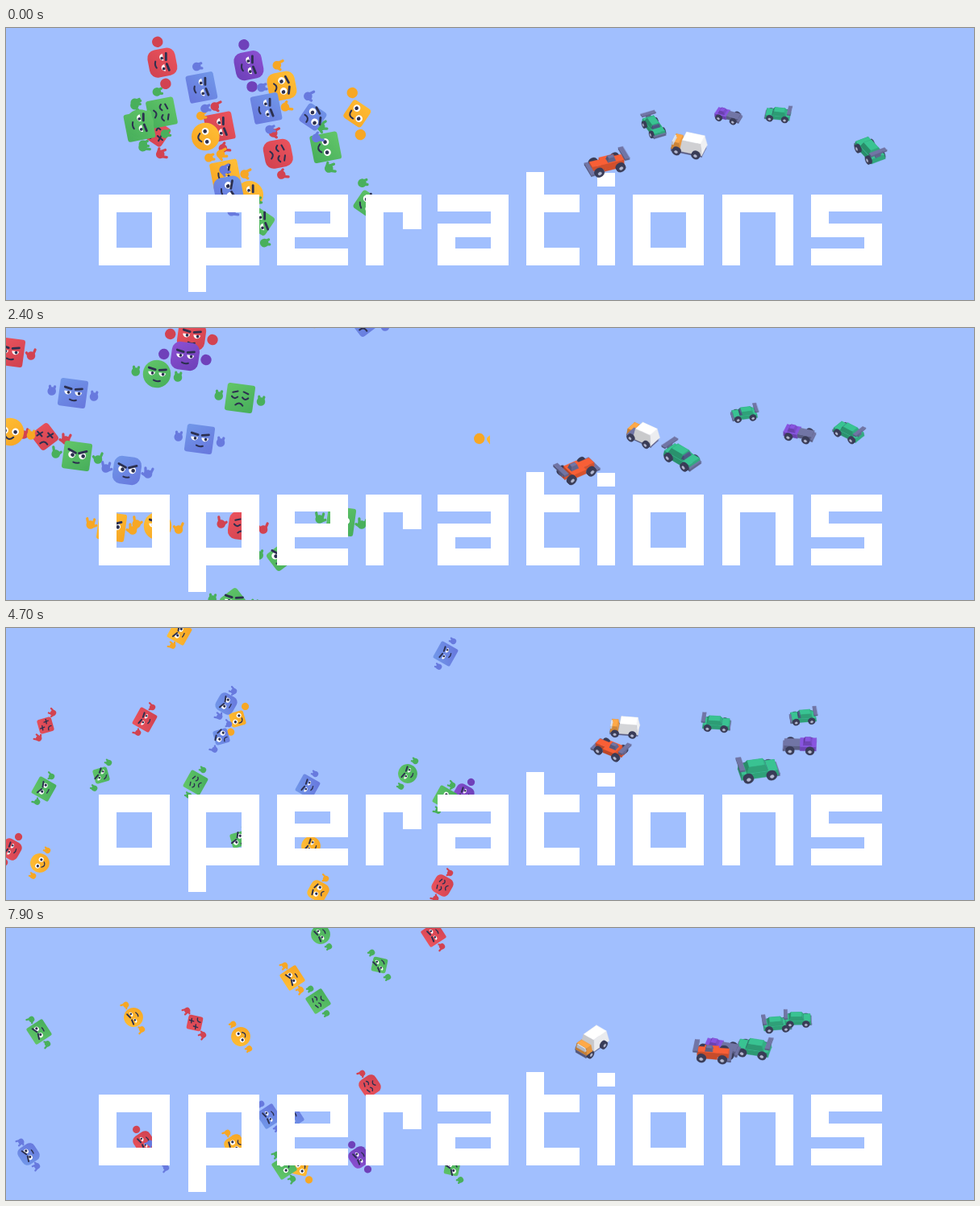
Recreate the animation shown at these times as an HTML page with a canvas. Size 1200x338 px, loop 8 s.

```html
<!DOCTYPE html>
<html lang="en">
<head>
<meta charset="utf-8">
<title>operations</title>
<style>
  html, body { margin: 0; width: 100%; height: 100%; overflow: hidden; background: #a1bffe; }
  canvas { display: block; width: 1200px; height: 338px; }
</style>
</head>
<body>
<canvas id="stage" width="1200" height="338" role="img" aria-label="operations"></canvas>
<script>
const ctx = document.getElementById('stage').getContext('2d');
const LOOP = 8000, STEP = 100, INK = '#2c3050', RAD = Math.PI / 180;

const clamp = k => Math.max(0, Math.min(1, k));
const mix = (a, b, k) => a + (b - a) * k;
const smooth = (from, to, v) => {
  const k = clamp((v - from) / (to - from));
  return k * k * (3 - 2 * k);
};
const random = seed => {
  const v = Math.sin(seed * 127.1 + 31.7) * 43758.5;
  return v - Math.floor(v);
};

// ---------- word ----------
const word = new Path2D();
const block = (x, y, r, b) => word.rect(x, y, r - x, b - y);
function ring(x) {
  block(x, 207, x + 88, 229);
  block(x, 273, x + 88, 295);
  block(x, 229, x + 22, 273);
  block(x + 66, 229, x + 88, 273);
}
function bars(x) {
  block(x, 207, x + 88, 228);
  block(x, 243, x + 88, 260);
  block(x, 274, x + 88, 295);
}
ring(115);
ring(226); block(226, 295, 248, 328);
bars(336); block(336, 228, 358, 274); block(402, 228, 424, 243);
block(446, 207, 515, 229); block(446, 229, 468, 295); block(492, 229, 515, 250);
bars(535); block(601, 228, 623, 274); block(535, 260, 557, 274);
block(645, 179, 667, 295); block(667, 207, 711, 229); block(667, 273, 711, 295);
block(733, 180, 755, 197); block(733, 207, 755, 295);
ring(777);
block(888, 207, 976, 229); block(888, 229, 910, 295); block(954, 229, 976, 295);
bars(998); block(998, 228, 1020, 243); block(1064, 260, 1086, 274);

// ---------- faces ----------
// Every CYCLE each face glides in a straight line to a new stop, then waits there.
const CYCLE = 3050, GLIDE = 1190, LEAD = 600;
const TONES = {
  red: ['#e9525c', '#d24351'],
  yellow: ['#ffbd35', '#f7a724'],
  green: ['#60c468', '#49b05c'],
  blue: ['#7095e8', '#687ade'],
  purple: ['#8a4fd0', '#6f41ba']
};
const faces = [];
function face(tone, shape, mood, hand, ...stops) {
  const seed = faces.length * 2 + 1;
  const first = [40 + 520 * random(seed), 30 + 290 * random(seed + 1)];
  faces.push({ tone, shape, mood, hand, stops: [first, ...stops] });
}

face('red', 'square', 'smirk', 'point', [5, 30], [172, 114], [530, 8]);
face('red', 'round', 'smirk', 'fist', [230, 10], [6, 275], [171, 266]);
face('red', 'diamond', 'dizzy', 'horns', [48, 135], [49, 121], [234, 118]);
face('red', 'round', 'sad', 'point', [293, 246], [541, 320], [451, 196]);
face('yellow', 'square', 'angry', 'horns', [131, 247], [215, 6], [355, 62]);
face('yellow', 'round', 'worried', 'point', [376, -18], [387, 327], [284, 270]);
face('yellow', 'diamond', 'smile', 'fist', [613, 140], [287, 113], [365, 298]);
face('yellow', 'circle', 'smirk', 'point', [188, 246], [378, 271], [158, 111]);
face('yellow', 'circle', 'smile', 'open', [5, 129], [42, 292], [291, 135]);
face('purple', 'round', 'smirk', 'fist', [222, 35], [567, 207], [438, 285]);
face('green', 'square', 'sad', 'open', [290, 87], [235, 192], [387, 91]);
face('green', 'square', 'angry', 'point', [88, 159], [47, 200], [41, 129]);
face('green', 'diamond', 'smirk', 'open', [282, 340], [118, 183], [463, 46]);
face('green', 'circle', 'smirk', 'open', [187, 57], [498, 181], [390, 8]);
face('green', 'diamond', 'angry', 'open', [340, 285], [288, 263], [553, 298]);
face('green', 'square', 'smile', 'horns', [415, 240], [544, 211], [345, 297]);
face('blue', 'square', 'smirk', 'open', [240, 138], [545, 32], [354, 235]);
face('blue', 'square', 'smirk', 'open', [83, 81], [374, 197], [326, 234]);
face('blue', 'diamond', 'worried', 'point', [444, -6], [267, 135], [188, 283]);
face('blue', 'round', 'angry', 'horns', [150, 177], [273, 94], [28, 281]);

function line(...p) {
  ctx.beginPath();
  for (let i = 0; i < p.length; i += 2) ctx.lineTo(p[i], p[i + 1]);
  ctx.stroke();
}
function disc(x, y, r, fill, from = 0, to = 7) {
  ctx.beginPath();
  ctx.arc(x, y, r, from, to);
  ctx.fillStyle = fill;
  ctx.fill();
}
function curve(x, y, w, bend) {
  ctx.beginPath();
  ctx.moveTo(x - w, y);
  ctx.quadraticCurveTo(x, y + bend, x + w, y);
  ctx.stroke();
}

function drawHand(side, kind, tone) {
  ctx.save();
  ctx.translate(side * 26, 1);
  ctx.scale(side, 1);
  disc(0, 0, kind === 'fist' ? 6.6 : 5.2, tone);
  ctx.strokeStyle = tone;
  ctx.lineWidth = 3.2;
  if (kind === 'horns') { line(-3, -1, -4, -7); line(3, -1, 5, -7); line(-3, 2, -7, 0); }
  if (kind === 'point') { line(2, -1, 4, -8); line(-3, 0, -6, -3); }
  if (kind === 'open') { line(-2, -1, -3, -6); line(2, -1, 3, -6); }
  ctx.restore();
}

function drawBody(shape) {
  ctx.beginPath();
  if (shape === 'circle') ctx.arc(0, 0, 17, 0, 7);
  else if (shape === 'diamond') {
    ctx.save();
    ctx.rotate(45 * RAD);
    ctx.roundRect(-13, -13, 26, 26, 4);
    ctx.restore();
  } else {
    ctx.roundRect(-17, -17, 34, 34, shape === 'round' ? 10 : 3);
  }
  ctx.fill();
}

function drawMood(mood) {
  ctx.strokeStyle = INK;
  for (const s of [-1, 1]) {
    const x = s * 6.5;
    ctx.lineWidth = 2;
    if (mood === 'dizzy') {
      line(x - 3, -5, x + 3, 0);
      line(x - 3, 0, x + 3, -5);
      continue;
    }
    if (mood === 'sad') {
      curve(x, -1, 3.6, 4);
      line(x - s * 3, -8, x + s * 3, -6);
      continue;
    }
    const lid = mood === 'smirk';
    if (lid) disc(x, -2, 4.3, '#fff', 0, Math.PI);
    else disc(x, -1, 4.3, '#fff');
    disc(x + (mood === 'smile' ? 0 : 1), lid ? -.4 : -.6, lid ? 1.8 : 2.3, INK);
    ctx.lineWidth = 2.8;
    if (mood === 'angry') line(x - s * 4.5, -3.5, x + s * 4.5, -7);
    if (mood === 'worried') line(x - s * 4, -9, x + s * 4, -6.5);
    if (lid) line(x - s * 4, -5, x + s * 4, -6.5);
  }
  ctx.lineWidth = 2;
  if (mood === 'smile') curve(0, 6, 5, 6);
  else if (mood === 'smirk') curve(1, 8, 4, 2);
  else if (mood === 'angry') curve(0, 8, 3.5, 1);
  else curve(0, 9, 4.5, -5);
}

function drawFaces(t) {
  const sec = t / 1000, n = Math.floor((t + LEAD) / CYCLE), age = (t + LEAD) % CYCLE;
  const k = clamp(age / GLIDE);
  const turn = 79 - 29.7 * Math.min(sec, 6.4) - 8 * Math.max(0, sec - 6.4);
  const size = 1.02 - .32 * (smooth(600, 1200, age) - smooth(2400, CYCLE, age));
  ctx.save();
  ctx.beginPath();
  ctx.rect(0, 0, 600, 338);
  ctx.clip();
  for (const f of faces) {
    const [a, b] = f.stops.slice(n, n + 2), [light, dark] = TONES[f.tone];
    ctx.save();
    ctx.translate(mix(a[0], b[0], k), mix(a[1], b[1], k));
    ctx.rotate(turn * RAD);
    ctx.scale(size, size);
    drawHand(-1, f.hand, dark);
    drawHand(1, f.hand, dark);
    const fill = ctx.createLinearGradient(-12, -15, 12, 15);
    fill.addColorStop(0, light);
    fill.addColorStop(1, dark);
    ctx.fillStyle = fill;
    drawBody(f.shape);
    drawMood(f.mood);
    ctx.restore();
  }
  ctx.restore();
}

// ---------- cars ----------
const GREY = '#6b6f9c', GREEN = '#36b88a', RED = '#ea5a33', PURPLE = '#8150d4', GLASS = '#55608f';
const TILT = .64, RISE = .77; // camera pitch: ground depth and height on screen
// part: back, front, half width, bottom, top, colour, taper of the roof
const part = (l0, l1, w, h0, h1, color, taper = 0) => ({ l0, l1, w, h0, h1, color, taper });
const MODELS = {
  sport: [
    part(-.46, .46, .22, .09, .25, GREEN, .02),
    part(-.32, .2, .19, .25, .4, GREEN, .07),
    part(.12, .2, .14, .25, .35, GLASS, .03),
    part(.44, .49, .22, .07, .15, GREY),
    part(-.5, -.38, .25, .38, .43, GREY),
    part(-.46, -.42, .08, .25, .38, GREY)
  ],
  racer: [
    part(-.42, .44, .11, .1, .25, RED),
    part(-.24, .14, .21, .1, .23, RED),
    part(-.2, 0, .08, .25, .36, GREY, .03),
    part(.42, .52, .25, .07, .13, GREY),
    part(-.52, -.4, .24, .32, .38, GREY),
    part(-.48, -.44, .07, .2, .32, GREY)
  ],
  roadster: [
    part(-.46, 0, .2, .1, .26, PURPLE),
    part(-.34, -.1, .14, .26, .38, PURPLE, .05),
    part(0, .46, .16, .1, .25, GREY),
    part(.44, .5, .19, .07, .15, GREY)
  ],
  truck: [
    part(-.46, .46, .2, .06, .16, GREY),
    part(-.48, .18, .25, .16, .54, '#fbfcff', .06),
    part(.2, .45, .21, .16, .4, '#f5a044', .03),
    part(.41, .46, .16, .27, .38, '#dfe6f5', .02)
  ]
};
const cars = [];
const car = (model, ...route) => cars.push({ model, route });

// one point every two seconds, joined by a smooth curve
car('sport', [957, 106], [928, 104], [864, 115], [934, 119], [956, 118]);
car('sport', [1071, 150], [1053, 132], [1002, 110], [972, 112], [982, 112]);
car('sport', [803, 121], [828, 152], [893, 177], [994, 160], [925, 147]);
car('roadster', [895, 107], [965, 125], [1036, 143], [860, 140], [888, 147]);
car('truck', [846, 146], [795, 135], [774, 125], [752, 126], [725, 144]);
car('racer', [745, 166], [702, 176], [754, 153], [746, 143], [880, 153]);

function along(route, t) {
  const last = route.length - 1, u = clamp(t / LOOP) * last;
  const i = Math.min(last - 1, Math.floor(u)), k = u - i;
  const at = n => route[Math.max(0, Math.min(last, n))];
  return [0, 1].map(d => {
    const [a, b, c, e] = [at(i - 1)[d], at(i)[d], at(i + 1)[d], at(i + 2)[d]];
    return b + k / 2 * (c - a + k * (2 * a - 5 * b + 4 * c - e + k * (3 * (b - c) + e - a)));
  });
}

function shade(hex, k) {
  const n = parseInt(hex.slice(1), 16);
  return `rgb(${[n >> 16, n >> 8 & 255, n & 255].map(v => Math.min(255, v * k | 0))})`;
}

function drawCar({ model, route }, t) {
  const [x, y] = along(route, t), from = along(route, t - 120), to = along(route, t + 120);
  const a = Math.atan2((to[1] - from[1]) / TILT, to[0] - from[0]);
  const s = y * .27 + 4, cos = Math.cos(a), sin = Math.sin(a);
  const point = (l, w, h) => [
    x + (l * cos - w * sin) * s,
    y + ((l * sin + w * cos) * TILT - (h - .22) * RISE) * s
  ];
  const depth = (l, w, h) => (l * sin + w * cos) * RISE + h * TILT;
  const poly = (points, fill) => {
    ctx.beginPath();
    points.forEach(p => ctx.lineTo(...p));
    ctx.closePath();
    ctx.fillStyle = ctx.strokeStyle = fill;
    ctx.fill();
    ctx.lineWidth = .4;
    ctx.stroke();
  };

  const box = ({ l0, l1, w, h0, h1, color, taper: r }) => {
    const low = [[l0, -w], [l1, -w], [l1, w], [l0, w]];
    const high = [[l0 + r, r - w], [l1 - r, r - w], [l1 - r, w - r], [l0 + r, w - r]];
    const facing = [-cos, sin, cos, -sin], lit = [sin, cos, -sin, -cos];
    const order = [0, 1, 2, 3].sort((p, q) => facing[p] - facing[q]);
    for (const n of order) {
      if (facing[n] < 0 && !r) continue;
      const m = (n + 1) % 4;
      poly([point(...low[n], h0), point(...low[m], h0), point(...high[m], h1), point(...high[n], h1)],
        shade(color, .86 + .1 * lit[n]));
    }
    poly(high.map(p => point(...p, h1)), shade(color, 1.06));
  };

  const wheel = (l, w) => {
    const circle = (r, side) => Array.from({ length: 14 }, (_, n) =>
      point(l + r * Math.cos(n * Math.PI / 7), side, .11 + r * Math.sin(n * Math.PI / 7)));
    const outside = w * cos > 0, inner = w - Math.sign(w) * .09;
    const [near, far] = outside ? [w, inner] : [inner, w];
    for (let n = 0; n <= 4; n++) poly(circle(.12, mix(far, near, n / 4)), '#3a3d58');
    if (outside) poly(circle(.05, near), '#b4b8d0');
  };

  const items = MODELS[model].map(p => ({
    z: depth((p.l0 + p.l1) / 2, 0, (p.h0 + p.h1) / 2),
    draw: () => box(p)
  }));
  for (const l of [-.29, .29]) for (const w of [-.26, .26]) {
    items.push({ z: depth(l * .2, w, .11) + (w * cos > 0 ? .1 : -.1), draw: () => wheel(l, w) });
  }
  items.sort((p, q) => p.z - q.z).forEach(p => p.draw());
}

// ---------- loop ----------
function render(now) {
  const t = Math.floor(now % LOOP / STEP) * STEP;
  ctx.fillStyle = '#a1bffe';
  ctx.fillRect(0, 0, 1200, 338);
  ctx.lineCap = ctx.lineJoin = 'round';
  drawFaces(t);
  ctx.fillStyle = '#fff';
  ctx.fill(word);
  cars.forEach(c => drawCar(c, t));
}

const start = performance.now();
function tick() {
  render(performance.now() - start);
  requestAnimationFrame(tick);
}
tick();
</script>
</body>
</html>
```
